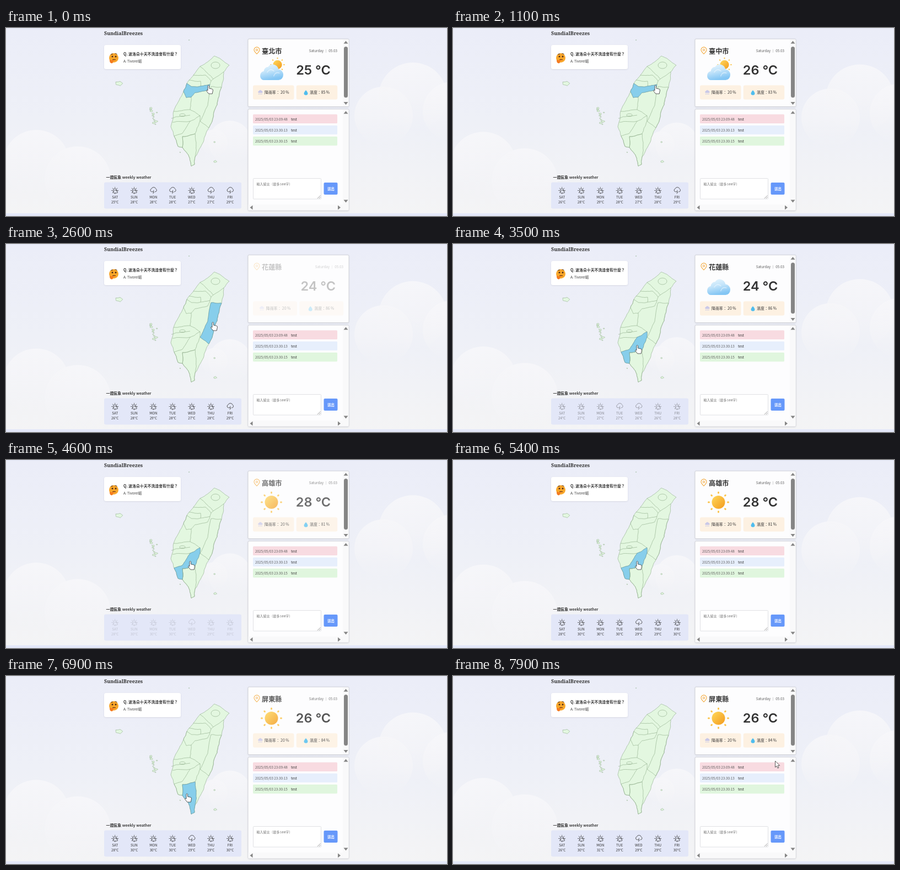
Recreate the animation shown at these times as an HTML page. Size 800 by 343 pixels, loop 8 s.

```html
<!DOCTYPE html>
<html lang="zh-Hant">
<head>
<meta charset="utf-8">
<title>Weather dashboard</title>
<style>
  html, body { margin: 0; width: 100%; height: 100%; overflow: hidden; background: #eef0f7; }
  svg { display: block; width: 800px; height: 343px; }
  text { font-family: "Noto Sans CJK TC", "Noto Sans CJK", "Noto Sans", sans-serif; font-size: 6.3px; fill: #333; }
  .ui { font-family: Inter, "Noto Sans CJK TC", "Noto Sans CJK", sans-serif; font-weight: 600; }
  .title { font: 700 9px "Noto Serif", serif; }
  .hint { font: 6px "Noto Sans Mono", "Noto Sans CJK TC", monospace; fill: #777; }
  .bold { font-weight: 700; }
  .mid { text-anchor: middle; }
  .end { text-anchor: end; }
  .soft { fill: #5c5c5c; }
  .chip { font-size: 6.9px; }
  .land { fill: #e3f7e0; stroke: #93b08f; stroke-width: .65; stroke-linejoin: round; }
  .border { fill: none; stroke: #93b08f; stroke-width: .65; }
  .hover { fill: #87ceeb; stroke: #6499a8; stroke-width: .65; }
  .line { fill: none; stroke: #333; stroke-width: .8; stroke-linecap: round; stroke-linejoin: round; }
  .card { fill: #fdfdfe; stroke: #cbccd2; stroke-width: .8; filter: url(#shadow); }
  .bar { fill: #858585; }
</style>
</head>
<body>
<svg viewBox="0 0 800 343">
  <defs>
    <linearGradient id="sky" x2="0" y2="1">
      <stop stop-color="#ebedf8"/><stop offset=".5" stop-color="#eef0f7"/><stop offset="1" stop-color="#f4f4f5"/>
    </linearGradient>
    <linearGradient id="mist" x2="0" y2="1">
      <stop stop-color="#f7f7fa" stop-opacity=".9"/><stop offset=".55" stop-color="#f5f5f8" stop-opacity=".7"/>
      <stop offset="1" stop-color="#f4f4f7" stop-opacity="0"/>
    </linearGradient>
    <linearGradient id="blue" x2=".3" y2="1">
      <stop stop-color="#e8f6fe"/><stop offset=".5" stop-color="#c3e4fa"/><stop offset="1" stop-color="#84c6f4"/>
    </linearGradient>
    <linearGradient id="gold" x2="1" y2="1">
      <stop stop-color="#ffd95c"/><stop offset="1" stop-color="#f39a1c"/>
    </linearGradient>
    <filter id="shadow" x="-10%" y="-10%" width="120%" height="120%">
      <feDropShadow dx="0" dy=".8" stdDeviation=".8" flood-color="#667" flood-opacity=".18"/>
    </filter>

    <g id="cloudShape">
      <path d="M-13 14a7 7 0 0 1-1-14a8 8 0 0 1 8-7a11 11 0 0 1 19 4a8.500 8.500 0 0 1 0 17z" fill="url(#blue)"/>
      <path d="M-8 2q6-8 13-2M4 8q3-8 11-5" fill="none" stroke="#fff" stroke-width="1.2" opacity=".5"/>
    </g>
    <g id="sun"><g id="rays" stroke="#fbc34a" stroke-width="3" stroke-linecap="round"></g><circle r="12" fill="url(#gold)"/></g>
    <g id="cloud"><use href="#cloudShape" transform="scale(1 1.15)"/></g>
    <g id="partly"><use href="#sun" transform="translate(11 -10) scale(.68)"/><use href="#cloudShape" transform="translate(0 2) scale(1 1.15)"/></g>

    <g id="fair" class="line">
      <g id="ticks"></g>
      <circle r="3.4"/>
      <path d="M-1.600 4.500a1.800 1.800 0 0 1 .2-3.600a2.300 2.300 0 0 1 4.300.2a1.700 1.700 0 0 1 .3 3.400z" fill="#e3e7f8"/>
    </g>
    <g id="storm" class="line">
      <path d="M-2 2.300h-1a2.900 2.900 0 0 1-.4-5.600a4.200 4.200 0 0 1 7.900.2a2.900 2.900 0 0 1-.8 5.400h-.7"/>
      <path d="M.7-.2L-1 2.500h2.200L-.4 5.400"/>
    </g>
  </defs>

  <rect width="800" height="343" fill="url(#sky)"/>
  <path d="M0 .4H800" stroke="#e1e5f7" stroke-width=".8"/>
  <g id="mists" fill="url(#mist)">
    <circle cx="130" cy="276" r="60"/><circle cx="55" cy="246" r="60"/>
    <circle cx="378" cy="209" r="24"/><circle cx="406" cy="208" r="39"/>
    <circle cx="685" cy="160" r="53"/><circle cx="738" cy="125" r="62"/><circle cx="810" cy="152" r="54"/>
  </g>
  <rect y="338" width="800" height="5" fill="#e4e8f9"/>

  <text class="title" x="178" y="13">SundialBreezes</text>
  <g id="map"></g>

  <rect x="178" y="31" width="139" height="44" rx="3.5" fill="#fff" filter="url(#shadow)"/>
  <circle cx="195.500" cy="54.500" r="8.500" fill="#f9a72b"/>
  <g fill="#4b2b17">
    <circle cx="193" cy="52" r="1.500"/><circle cx="199" cy="52" r="1.500"/>
    <path d="M190 48.500q2-2 4-.8M197.500 47q2.500-1 4 1M193 58q3-1.500 6 0" fill="none" stroke="#4b2b17"/>
  </g>
  <path d="M188 59q1.500-2 3 0l6-1.200q1.500.8-1 1.800l-2 .8q1 3-2 4q-4 0-4-5.400z" fill="#f47b20"/>
  <text class="bold" x="213" y="50" style="font-size:6.9px">Q. 波洛朵十天不洗澡會有什麼？</text>
  <text x="213" y="62.500">A: Tivorel垢</text>

  <text class="ui" x="181.500" y="274.500" style="font-size:6.9px">一週氣象 weekly weather</text>
  <rect x="178" y="281.500" width="249" height="48" rx="3" fill="#e3e7f8"/>
  <g id="week"></g>

  <rect class="card" x="439" y="20" width="183" height="123.500" rx="2"/>
  <g id="panel">
    <path d="M455 47.300q-5-5-5-7.400a5 5 0 0 1 10 0q0 2.400-5 7.400z" fill="none" stroke="#f3a83b" stroke-width="1.100"/>
    <circle cx="455" cy="40" r="1.700" fill="none" stroke="#f3a83b"/>
    <text id="city" class="bold" x="464" y="47" style="font-size:12.200px"></text>
    <text id="date" class="end soft" y="44">Saturday ｜ 05.03</text>
    <use id="icon" x="481.500" y="77"/>
    <text id="temp" class="ui mid" y="85.300" style="font-size:23.500px"></text>
    <rect id="chipA" x="448" y="104.500" height="26" rx="3" fill="#fdf1e2"/>
    <rect id="chipB" y="104.500" height="26" rx="3" fill="#fdf1e2"/>
    <g id="rain">
      <path d="M458.500 118.500a1.800 1.800 0 0 1 .3-3.500a2.800 2.800 0 0 1 5.200 0a1.800 1.800 0 0 1 .2 3.500z" fill="#c9c8e8"/>
      <path d="M459 120l-.6 1M461.500 120l-.6 1M464 120l-.6 1" stroke="#7d8ce0" stroke-width=".8"/>
      <text class="chip" x="469" y="120.300">降雨率： 20 %</text>
    </g>
    <g id="damp">
      <path d="M544 113.500q3.500 4 3.500 5.600a3.300 3.300 0 0 1-7 0q0-1.600 3.500-5.600z" fill="#4fbdee"/>
      <text id="humid" class="chip" x="551" y="120.300"></text>
    </g>
  </g>
  <g id="scroll" class="bar">
    <rect x="611" y="21" width="10.500" height="121.500" fill="#f9f9fa"/>
    <rect x="613" y="34" width="7" height="93" rx="3.500"/>
    <path d="M612.500 28.500l4-5 4 5zM612.500 135l4 5 4-5z"/>
  </g>

  <rect class="card" x="439" y="148" width="183" height="185" rx="2"/>
  <path d="M611 149h10.500v183.500H439.500V322H611z" fill="#f9f9fa"/>
  <path class="bar" d="M612.500 156.500l4-5 4 5zM612.500 313.500l4 5 4-5zM447.500 323.500l-5 4 5 4zM602 323.500l5 4-5 4z"/>
  <g id="notes"></g>
  <rect x="448.500" y="274.500" width="123" height="37.500" rx="1" fill="#fff" stroke="#d9dade" stroke-width=".8"/>
  <path d="M565 311l5.500-5.500M568 311l2.500-2.500" stroke="#777" stroke-width=".7"/>
  <text class="hint" x="454.500" y="287.300">輸入留言（最多100字）</text>
  <rect x="576.500" y="282" width="25" height="22" rx="2" fill="#6698fa"/>
  <text class="bold mid" x="589.500" y="295.500" style="fill:#fff">送出</text>

  <g id="cursor" fill="#fff" stroke="#333" stroke-width=".8" stroke-linejoin="round">
    <path id="hand" d="M-4-6.500q1.500-1.800 2.600 0v4.600l5 1.100q2.200.5 1.800 2.800l-1.200 6h-6.500l-4.200-5.400q.2-1.800 1.700-1.100l.8.800z"/>
    <path id="arrow" d="M-3.500-6v11.500l2.700-2.400 1.800 4.100 2-.9-1.800-4h3.500z"/>
  </g>
</svg>

<script>
const LOOP = 8000, FADE = 1000, MOVE = 500;
const $ = id => document.getElementById(id);
const set = (el, attrs) => { for (const k in attrs) el.setAttribute(k, attrs[k]); return el; };
const add = (parent, tag, attrs, text = '') => {
  const el = set(document.createElementNS('http://www.w3.org/2000/svg', tag), attrs);
  el.textContent = text;
  return parent.appendChild(el);
};
const show = (id, on) => set($(id), { visibility: on ? 'visible' : 'hidden' });
const clamp = v => Math.min(1, Math.max(0, v));
const hash = n => { const v = Math.sin(n) * 43758; return v - Math.floor(v); };

// Fractal coastline: each midpoint shifts by a hash of its own place, so shared borders agree.
function split([a, b], [x, y], depth) {
  if (!depth) return `L${x} ${y}`;
  const mx = (a + x) / 2, my = (b + y) / 2, seed = mx * 12.9 + my * 78.2;
  const size = Math.hypot(x - a, y - b) * .12;
  const m = [mx + (hash(seed) - .5) * size, my + (hash(seed + 3) - .5) * size];
  return split([a, b], m, depth - 1) + split(m, [x, y], depth - 1);
}
function outline(points, closed) {
  const p = points.split(' ').map(s => s.split(',').map(Number));
  if (closed) p.push(p[0]);
  return 'M' + p[0] + p.slice(1).map((q, i) => split(p[i], q, 3)).join('') + (closed ? 'z' : '');
}

const coast = '378,51 390,57 405,68 395,80 391,108 383,140 374,170 368,182 358,208 343,235 342,249 336,252 331,232 320,218 312,216 305,197 299,180 304,152 314,132 322,116 328,101 340,86 352,70 368,60';
const regions = {
  taichung: '322,116 328,101 337,107 353,106 370,103 366,113 343,118 336,126 327,127',
  hualien: '391,108 383,140 374,170 368,182 352,170 366,141 372,107',
  kaohsiung: '352,160 352,170 343,193 320,198 320,218 312,216 305,197 320,192 334,170',
  pingtung: '320,198 343,193 345,209 343,235 342,249 336,252 331,232 320,218'
};
const borders = [
  '352,70 366,83 376,93 395,80', '340,86 362,86 372,97 370,103', '332,95 353,97 353,106', '376,93 372,97',
  '336,126 334,149 352,160', '304,152 334,149', '300,165 334,159', '302,172 334,170'
];

const map = $('map'), hoverShapes = {};
const islet = (x, y, r) => add(map, 'path', {
  class: 'land',
  d: outline([0, 1, 2, 3, 4].map(i => {
    const a = i * 1.257, k = r * (.6 + hash(x + i) * .7);
    return [x + k * Math.cos(a) * 1.3, y + k * Math.sin(a) * .8];
  }).join(' '), true)
});
add(map, 'path', { class: 'land', d: outline(coast, true) });
borders.forEach(p => add(map, 'path', { class: 'border', d: outline(p) }));
add(map, 'ellipse', { class: 'border', cx: 380, cy: 68, rx: 8, ry: 6 });
add(map, 'ellipse', { class: 'border', cx: 320, cy: 159, rx: 5, ry: 2.5 });
for (const name in regions) {
  const d = outline(regions[name], true);
  add(map, 'path', { class: 'border', d });
  hoverShapes[name] = add(map, 'path', { class: 'hover', d });
}
for (let i = 0; i < 12; i++)
  islet(262 + hash(i + 1) * 14, 146 + i * 2.7, .8 + hash(i + 20) * 1.8);
[[205, 101, 5.5], [378, 208, 1.5], [379, 244, 2.5], [316, 227, .8], [332, 22, .7]].forEach(p => islet(...p));

for (let i = 0; i < 8; i++) {
  const transform = `rotate(${i * 45})`;
  add($('rays'), 'path', { d: 'M0-17V-18', transform });
  add($('ticks'), 'path', { d: 'M0-5V-6', transform });
}

[['23:09:48', '#f8dbe1'], ['23:30:13', '#e7effc'], ['23:30:15', '#e0f6de']].forEach(([time, fill], i) => {
  const y = 157.5 + i * 20.3;
  add($('notes'), 'rect', { x: 448, y, width: 153, height: 16.5, rx: 1.5, fill });
  add($('notes'), 'text', { class: 'soft', x: 452, y: y + 11 }, '2025/05/03 ' + time);
  add($('notes'), 'text', { x: 517, y: y + 11 }, 'test');
});

const days = ['SAT', 'SUN', 'MON', 'TUE', 'WED', 'THU', 'FRI'].map((day, i) => {
  const x = 197.7 + i * 34.8, g = $('week');
  const icon = add(g, 'use', { x, y: 296.5 });
  add(g, 'text', { class: 'mid', x, y: 311 }, day);
  return { icon, temp: add(g, 'text', { class: 'mid', x, y: 319.7 }) };
});

// at, weekAt: start of the two fades; wait: time the icon takes to load; * marks a storm.
const cities = [
  { at: -2000, weekAt: -2000, wait: 0, name: '臺北市', temp: 25, humid: 85, icon: 'partly', week: '25 28 28* 28* 27 27* 29*' },
  { at: 90, weekAt: 250, wait: 0, name: '臺中市', temp: 26, humid: 83, icon: 'partly', week: '26 28 29 28 27 28 29*' },
  { at: 2450, weekAt: 3200, wait: 250, name: '花蓮縣', temp: 24, humid: 86, icon: 'cloud', week: '24 27 27 27* 26* 26 28' },
  { at: 4150, weekAt: 4500, wait: 250, name: '高雄市', temp: 28, humid: 81, icon: 'sun', week: '28 30 30 30 29* 29 30' },
  { at: 6320, weekAt: 6950, wait: 0, name: '屏東縣', temp: 26, humid: 84, icon: 'sun', week: '26 30 31 29 29* 29 30' }
];
// Where the pointer rests, and when it sets off for the next stop.
const stops = [
  { region: 'taichung', x: 370, y: 112, leave: 1650 },
  { region: 'hualien', x: 378, y: 150, leave: 2900 },
  { region: 'kaohsiung', x: 337, y: 192, leave: 5650 },
  { region: 'pingtung', x: 331, y: 222, leave: 7200 },
  { x: 588, y: 161, leave: LOOP }
];

const fade = (t, start) => 1 - (1 - clamp((t - start) / FADE)) ** 2;
const latest = (key, t) => cities.filter(c => c[key] <= t).pop();

function drawPanel(t) {
  const c = latest('at', t), loading = t - c.at < c.wait, extra = loading ? 11 : 0;
  $('panel').style.opacity = fade(t, c.at);
  $('city').textContent = c.name;
  $('temp').textContent = c.temp + ' °C';
  $('humid').textContent = `濕度：${c.humid} %`;
  set($('icon'), { href: '#' + c.icon });
  show('icon', !loading);
  show('scroll', !loading);
  set($('date'), { x: 601 + extra });
  set($('temp'), { x: 557.5 + extra * .8 });
  set($('chipA'), { width: 74.5 + extra / 2 });
  set($('chipB'), { x: 526.7 + extra / 2, width: 74.5 + extra / 2 });
  set($('rain'), { transform: `translate(${extra / 4})` });
  set($('damp'), { transform: `translate(${extra * .75})` });
}

function drawWeek(t) {
  const c = latest('weekAt', t), week = c.week.split(' ');
  $('week').style.opacity = fade(t, c.weekAt);
  days.forEach((d, i) => {
    set(d.icon, { href: week[i].endsWith('*') ? '#storm' : '#fair' });
    d.temp.textContent = parseInt(week[i]) + '°C';
  });
}

function drawPointer(t) {
  const i = stops.findIndex(s => s.leave > t), to = stops[i], from = stops[i - 1] || to;
  const p = i ? clamp((t - from.leave) / MOVE) : 1, k = p * p * (3 - 2 * p);
  set($('cursor'), { transform: `translate(${from.x + (to.x - from.x) * k} ${from.y + (to.y - from.y) * k})` });
  const away = !to.region && p > .25;
  show('hand', !away);
  show('arrow', away);
  stops.forEach((s, j) => {
    if (!s.region) return;
    const on = j ? stops[j - 1].leave + MOVE / 2 : -MOVE;
    hoverShapes[s.region].style.opacity = clamp(Math.min(t - on, s.leave + MOVE / 2 - t) / 150);
  });
}

const start = performance.now();
function tick() {
  const t = (performance.now() - start) % LOOP;
  drawPanel(t);
  drawWeek(t);
  drawPointer(t);
  set($('mists'), { transform: `translate(0 ${3 - 3 * Math.cos(t * Math.PI / 2000)})` });
  requestAnimationFrame(tick);
}
tick();
</script>
</body>
</html>
```
